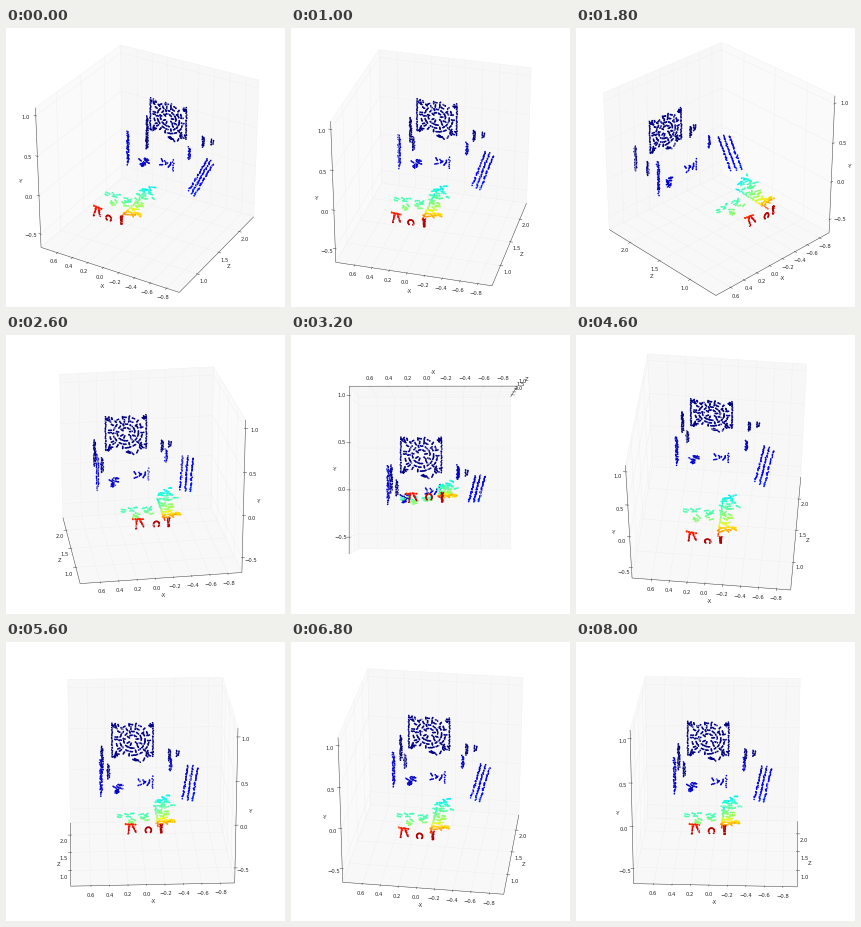
Write a matplotlib script that moves like this. It is 279x279 px and loops after 8200 ms.

```python
import numpy as np
import matplotlib.pyplot as plt
from matplotlib.animation import FuncAnimation
from matplotlib.collections import LineCollection, PolyCollection

SIZE, FRAMES, INTERVAL = 279, 41, 200
CENTER, FOCAL, DIST = np.array([143, 136.5]), 1595, 10
SPAN = 1.776                            # data length of every cube edge
MID = np.array([-0.069, 1.478, 0.21])   # data value at the cube centre
INK = "#2a2a2a"

# The camera is dragged between a few poses
STEP = [0, 6, 9, 12, 16, 23, 25, 28, 30, 34, 40]
AZIM = [30, 12, -43.5, -12, 0.6, 5.7, 27, -2.7, -40, 8, 2.6]
ELEV = [30, 30, 31, 30, -1, 45, 43, 21, 20, 28, 22]

# Cube coordinates: u to the right, w into depth, v up, each -0.5 .. 0.5
AXES = [("-X", np.linspace(0.6, -0.8, 8), -1),
        ("Z", np.linspace(1, 2, 3), 1),
        ("-Y", np.linspace(-0.5, 1, 4), 1)]

rng = np.random.default_rng(7)
cloud = []


def stroke(a, b, gap=0.009, jitter=0.002):
    a, b = np.array(a, float), np.array(b, float)
    n = int(np.linalg.norm(b - a) / gap) + 2
    t = np.linspace(0, 1, n)[:, None]
    cloud.append(a + (b - a) * t + rng.normal(0, jitter, (n, 3)))


def bar(u, w, v, height):
    """Upright edge, seen as a double line."""
    for du, cut in ((0, 0.5), (0.008, 0.4)):
        stroke((u + du, w, v - height * cut), (u + du, w, v + height * cut))


def dash(p, angle, length, lean=0.0):
    d = np.array([np.cos(angle), lean, np.sin(angle)]) * length / 2
    stroke(p - d, p + d, 0.007, 0.001)


def clutter(center, spread, count, length=0.02):
    for p in rng.uniform(-1, 1, (count, 3)) * spread + center:
        dash(p, rng.uniform(0, np.pi), length)


def poster(center, half_w, half_h):
    center = np.array(center)
    for x in (-half_w, half_w):
        stroke(center + (x, 0, -half_h), center + (x, 0, half_h))
        for y in (-half_h, half_h):
            clutter(center + np.array([x, 0, y]) * 0.84, (0.02, 0, 0.016), 5, 0.016)
    for radius in np.linspace(0.032, 0.106, 4):
        count = int(radius * 230)
        for k in range(count):
            a = 2 * np.pi * (k + rng.uniform(-0.25, 0.25)) / count
            p = center + radius * np.array([np.cos(a), 0, np.sin(a)])
            dash(p, a + rng.choice([0, np.pi / 2]), 0.016)


def ramp(low, high, lines=3, dashes=7):
    """Slanted panel of parallel broken lines."""
    low, high = np.array(low), np.array(high)
    for k in range(lines):
        shift = (k - 1) * np.array([0.03, -0.02, 0])
        for t in (np.arange(dashes) + rng.uniform(0, 0.2, dashes)) / dashes:
            a = low + shift + (high - low) * t
            stroke(a, a + (high - low) * 0.1, 0.006, 0.0025)


def mound(u, w, v, count):
    """Loose dashes on a surface that drops towards the viewer."""
    for t in rng.uniform(0, 1, count):
        p = (rng.uniform(*u), np.interp(t, (0, 1), w), np.interp(t, (0, 1), v))
        dash(np.array(p) + (0, 0, rng.normal(0, 0.008)),
             rng.uniform(-0.5, 0.5), 0.024, rng.uniform(-1, 1))


poster((-0.088, 0.40, 0.116), 0.132, 0.116)
for spec in ((-0.30, 0.24, -0.08, 0.25), (-0.29, 0.47, -0.04, 0.18),
             (-0.25, 0.40, -0.10, 0.10), (0.15, 0.43, 0.0, 0.08),
             (0.147, 0.25, 0.0, 0.09), (0.205, 0.45, 0.0, 0.04)):
    bar(*spec)
clutter((-0.07, 0.40, -0.028), (0.06, 0, 0.008), 6)
clutter((-0.19, 0.26, -0.17), (0.03, 0.02, 0.03), 10)
clutter((-0.02, 0.25, -0.12), (0.05, 0.01, 0.02), 6)
stroke((0.035, 0.25, -0.16), (0.035, 0.25, -0.08), 0.014)
ramp((0.25, 0.10, -0.19), (0.295, 0.27, -0.02))

mound((0.03, 0.14), (-0.13, -0.36), (-0.08, -0.16), 40)
mound((-0.20, -0.02), (-0.18, -0.25), (-0.16, -0.19), 17)
stroke((0.035, -0.12, -0.14), (0.035, -0.40, -0.16))

# three small figures in the front row
stroke((-0.165, -0.40, -0.14), (-0.10, -0.41, -0.14), 0.005)
stroke((-0.14, -0.41, -0.14), (-0.145, -0.43, -0.19), 0.005)
stroke((-0.12, -0.41, -0.145), (-0.10, -0.43, -0.18), 0.005)
for a in np.linspace(-0.8, 4, 24):
    cloud.append(np.array([[-0.025 + 0.018 * np.cos(a), -0.45,
                            -0.162 + 0.02 * np.sin(a)]]))
for u in (0.05, 0.056):
    stroke((u, -0.43, -0.19), (u, -0.43, -0.135), 0.005)

points = np.vstack(cloud)
points = points[np.argsort(-points[:, 1], kind="stable")]
disparity = 1 / (MID[1] + SPAN * points[:, 1])
colors = plt.cm.jet(np.clip(disparity - 0.45, 0, 0.95))


def project(p, azim, elev):
    p = np.asarray(p, float)
    s, c = np.sin(azim), np.cos(azim)
    se, ce = np.sin(elev), np.cos(elev)
    right = p @ np.array([c, s, 0])
    up = p @ np.array([-s * se, c * se, ce])
    near = p @ np.array([s * ce, -c * ce, se])
    scale = FOCAL / (DIST - near)
    return np.stack([CENTER[0] + right * scale, CENTER[1] - up * scale], -1)


def pane(axis, value):
    i, j = [k for k in range(3) if k != axis]
    quad = np.full((4, 3), value)
    quad[:, i] = [-0.5, 0.5, 0.5, -0.5]
    quad[:, j] = [-0.5, -0.5, 0.5, 0.5]
    return quad


fig = plt.figure(figsize=(SIZE / 72, SIZE / 72), dpi=72, facecolor="white")
ax = fig.add_axes([0, 0, 1, 1])
ax.set(xlim=(0, SIZE), ylim=(SIZE, 0))
ax.axis("off")

panes = PolyCollection([], facecolors=["#fafafa", "#f7f7f7", "#f8f8f8"],
                       edgecolors="#f1f1f1", linewidths=0.5)
grid = LineCollection([], colors="#eeeeee", linewidths=0.4)
edges = LineCollection([], colors="#444444", linewidths=0.5)
for item in (panes, grid, edges):
    ax.add_collection(item)
dots = ax.scatter(*points[:, :2].T, s=2.7, c=colors, linewidths=0)


def label(s):
    return ax.text(0, 0, s, fontsize=5.3, family="DejaVu Sans", color=INK,
                   ha="center", va="center")


names = [label(name) for name, _, _ in AXES]
tick_texts = [[label(f"{v:.1f}".replace("-", "\u2212").replace("\u22120.0", "0.0"))
               for v in values] for _, values, _ in AXES]


def draw(frame):
    azim, elev = (np.radians(np.interp(frame, STEP, turn)) for turn in (AZIM, ELEV))

    def view(p):
        return project(p, azim, elev)

    side = -0.5 if azim > 0 else 0.5
    floor = -0.5 if elev >= 0 else 0.5
    back = np.array([side, 0.5, floor])
    panes.set_verts([view(pane(k, back[k])) for k in range(3)])

    # midpoints of the three labelled edges
    bases = np.array([(0, -0.5, floor), (-side, 0, floor), (side, -0.5, 0)])
    lines, marks = [], []
    for axis, base in enumerate(bases):
        out = np.sign(base)
        ends = np.array([base, base])
        ends[:, axis] = -0.5, 0.5
        marks.append(view(ends))
        tick_dir = out * np.eye(3)[1 if axis == 0 else 0]
        _, values, sign = AXES[axis]
        for value, text in zip(sign * (values - MID[axis]) / SPAN, tick_texts[axis]):
            p = base.copy()
            p[axis] = value
            marks.append(view([p - tick_dir * 0.008, p + tick_dir * 0.016]))
            text.set_position(view(p + out * 0.044))
            for other in range(3):
                if other != axis:
                    g = np.array([back, back])
                    g[:, axis] = value
                    g[:, other] = -0.5, 0.5
                    lines.append(view(g))
        names[axis].set_position(view(base + out * 0.078))
    grid.set_segments(lines)
    edges.set_segments(marks)
    dots.set_offsets(view(points))
    return []


anim = FuncAnimation(fig, draw, frames=FRAMES, interval=INTERVAL,
                     repeat=True, repeat_delay=0, blit=False)
plt.show()
```
